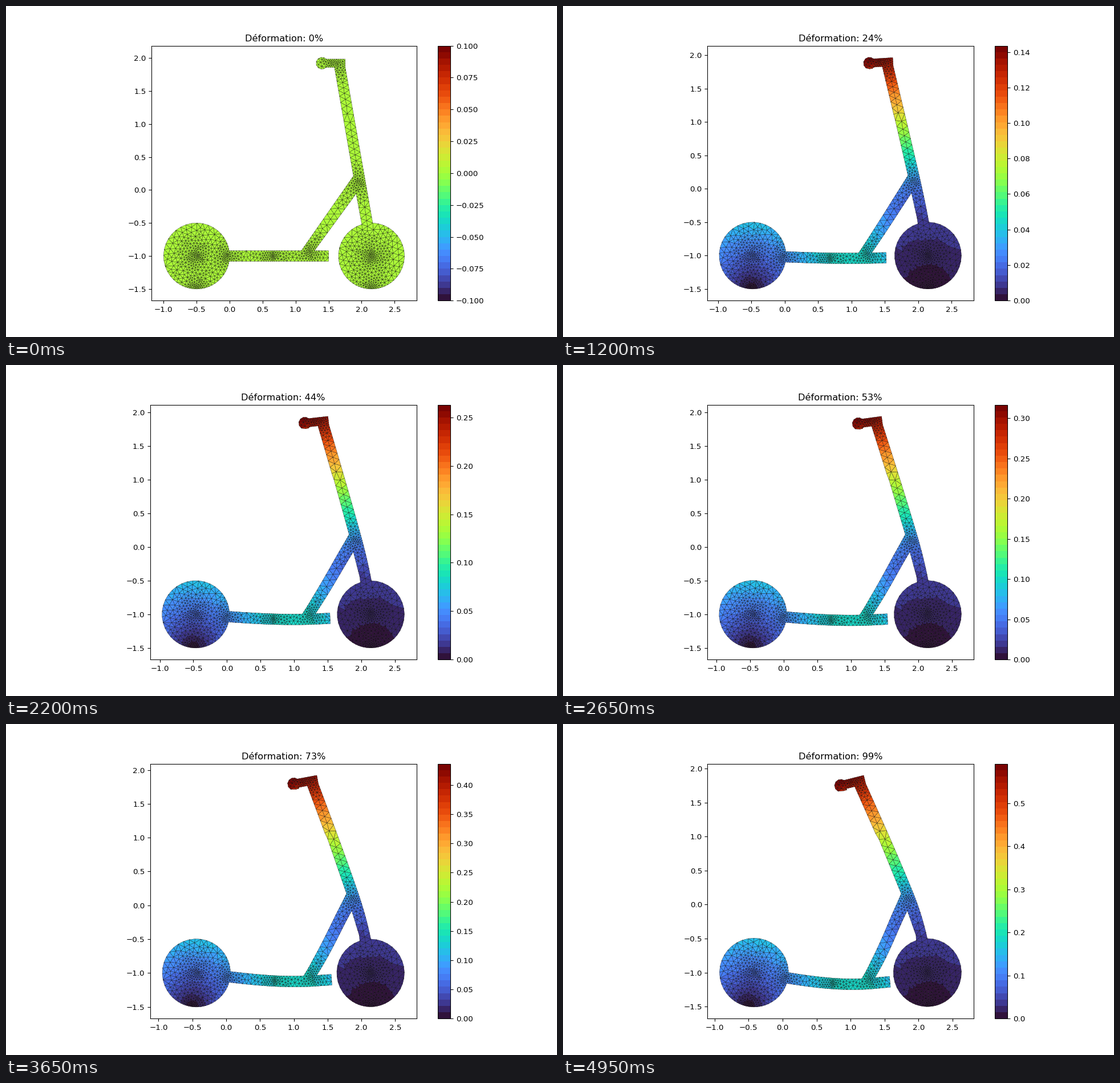
A matplotlib script that plays this animation: 966 px wide and 580 px high, repeating every 5000 ms.

```python
import numpy as np
import matplotlib.pyplot as plt
from matplotlib.animation import FuncAnimation
from matplotlib.collections import PolyCollection
from matplotlib.path import Path
from matplotlib.tri import Triangulation

FRAMES = 100
PEAK = 0.598          # largest displacement at 100 %
REAR, FRONT, GRIP = (-0.5, -1.0), (2.15, -1.0), (1.4, 1.92)
R, GRIP_R = 0.5, 0.09
DECK_TOP, DECK_BOTTOM = -0.92, -1.08
BAR_LOW, BAR_HIGH = 1.8575, 1.9825
LEAN = 0.176          # horizontal run of the column per unit of height

# Points where the mesh is refined: x, y, local element size
FOCI = np.array([
    (-0.5, -1.0, 0.016), (-0.5, -1.5, 0.014), (-0.04, -1.0, 0.019),
    (0.65, -1.0, 0.018), (1.22, -0.94, 0.02), (1.95, 0.1, 0.02),
    (2.15, -1.0, 0.016), (2.15, -1.5, 0.014), (1.5, 1.92, 0.026),
    (1.6, 1.92, 0.021), (1.69, 1.92, 0.025),
])


def size(p):
    gap = np.hypot(p[:, None, 0] - FOCI[:, 0], p[:, None, 1] - FOCI[:, 1])
    return np.minimum(0.095, (FOCI[:, 2] + 0.14 * gap).min(axis=1))


# ---------------------------------------------------------------- outline

def line(a, b):
    return np.linspace(a, b, 300)


def arc(centre, r, start, stop):
    a = np.linspace(start, stop, 600)
    return np.column_stack([centre[0] + r * np.cos(a), centre[1] + r * np.sin(a)])


def split(curve):
    """Nodes along a curve, spaced by the local element size, without the end."""
    step = np.hypot(*np.diff(curve, axis=0).T)
    mid = (curve[1:] + curve[:-1]) / 2
    s = np.concatenate([[0], np.cumsum(step / size(mid))])
    count = max(1, int(round(s[-1])))
    at = np.linspace(0, s[-1], count + 1)[:-1]
    return np.column_stack([np.interp(at, s, curve[:, k]) for k in (0, 1)])


def build_outline():
    rear = np.arcsin(0.08 / R)
    grip = np.arcsin(0.0625 / GRIP_R)
    parts = [arc(REAR, R, rear, 2 * np.pi - rear)]

    def go(*points):
        for q in points:
            parts.append(line(parts[-1][-1], q))

    go((1.5, DECK_BOTTOM), (1.5, DECK_TOP), (1.286, DECK_TOP), (1.918, -0.056))
    wheel = arc(FRONT, R, 1.867, 2 * np.pi + 1.533)
    go(wheel[0])
    parts.append(wheel)
    go((1.753, BAR_LOW), (1.753, BAR_HIGH))
    ring = arc(GRIP, GRIP_R, grip, 2 * np.pi - grip)
    go(ring[0])
    parts.append(ring)
    go((1.589, BAR_LOW), (1.877, 0.212), (1.087, DECK_TOP), parts[0][0])
    return np.vstack([split(c) for c in parts])


# ---------------------------------------------------------------- mesh

def scatter(edge, inside, rng):
    """Random interior nodes that keep the local element size apart."""
    clouds = [FOCI[:, :2], rng.uniform((-1, -1.5), (2.65, 2.02), (22000, 2))]
    for x, y, _ in FOCI:
        r = 0.5 * rng.random(2000) ** 1.6
        a = rng.uniform(0, 2 * np.pi, 2000)
        clouds.append(np.column_stack([x + r * np.cos(a), y + r * np.sin(a)]))
    cand = np.vstack(clouds)
    cand = cand[inside.contains_points(cand)]
    reach = (0.78 * size(cand)) ** 2
    nodes = np.empty((len(edge) + len(cand), 2))
    nodes[:len(edge)] = edge
    n = len(edge)
    for p, limit in zip(cand, reach):
        d = nodes[:n] - p
        if (d[:, 0] ** 2 + d[:, 1] ** 2).min() > limit:
            nodes[n] = p
            n += 1
    return nodes[:n].copy()


def build_mesh():
    rng = np.random.default_rng(4)
    edge = build_outline()
    inside = Path(np.vstack([edge, edge[:1]]))
    nodes = scatter(edge, inside, rng)
    fixed = len(edge)
    for _ in range(12):
        links = Triangulation(*nodes.T).edges
        both = np.vstack([links, links[:, ::-1]])
        total = np.zeros_like(nodes)
        np.add.at(total, both[:, 0], nodes[both[:, 1]])
        degree = np.maximum(np.bincount(both[:, 0], minlength=len(nodes)), 1)
        mean = total / degree[:, None]
        nodes[fixed:] += 0.6 * (mean[fixed:] - nodes[fixed:])
    tris = Triangulation(*nodes.T).triangles
    a, b, c = (nodes[tris[:, k]] for k in range(3))
    area = np.abs((b[:, 0] - a[:, 0]) * (c[:, 1] - a[:, 1])
                  - (b[:, 1] - a[:, 1]) * (c[:, 0] - a[:, 0]))
    keep = inside.contains_points((a + b + c) / 3) & (area > 1e-6)
    return nodes, tris[keep]


# ---------------------------------------------------------------- displacement

def turn(x, y, x0, y0, angle):
    return np.array([-angle * (y - y0), angle * (x - x0)])


def deck_shift(x, y):
    """Sagging deck; straight beyond the foot of the strut."""
    s = np.clip(x, 0, 1.25)
    sag = -0.08 - 0.16 * s + 0.031 * s ** 2 + 0.0373 * s ** 3
    slope = -0.16 + 0.062 * s + 0.1119 * s ** 2
    return np.array([0.08 + 0 * s, sag]) + turn(x, y, s, -1.0, slope)


def column_shift(x, y, low=-0.5, high=1.855):
    """Leaning column; each level turns a little more than the one below."""
    h = np.clip(y, low, high)
    z = np.clip(h + 0.5, 0, 0.7)
    q = np.clip((h - 0.2) / 1.655, 0, 1)
    angle = 0.04 + 0.253 * z + 0.035 * (2 * q - q ** 2)
    swing = (0.04 * z + 0.1265 * z ** 2
             + 1.655 * (0.217 * q + 0.035 * (q ** 2 - q ** 3 / 3)))
    squeeze = 0.022 * z
    axis = 1.6715 + LEAN * (1.853 - h)
    base = np.array([-0.04 - swing, -0.0026 - LEAN * swing - squeeze])
    return base + turn(x, y, axis, h, angle)


def displacement(nodes):
    x, y = nodes.T
    left = 1.589 + LEAN * (1.853 - y)
    up = np.maximum(y - DECK_TOP, 0)
    across = np.maximum(left - x, 0)
    t = up / np.maximum(up + across, 1e-9)
    w = t * t * (3 - 2 * t)
    deck = deck_shift(x, y)
    strut = (1 - w) * deck + w * column_shift(x, y, -0.05, 0.22)
    rear = np.hypot(x - REAR[0], y - REAR[1]) < R + 1e-3
    front = np.hypot(x - FRONT[0], y - FRONT[1]) < R + 1e-3
    column = (x >= left - 1e-6) | (y > 1.85)
    on_deck = y <= DECK_TOP + 1e-6
    u = np.select(
        [rear, front, column, on_deck],
        [turn(x, y, REAR[0], -1.5, -0.16), turn(x, y, FRONT[0], -1.5, 0.04),
         column_shift(x, y), deck],
        strut)
    return 1.01 * u.T


nodes, tris = build_mesh()
shift = displacement(nodes)
amount = np.hypot(*shift.T)[tris].mean(axis=1)

# ---------------------------------------------------------------- drawing

fig, ax = plt.subplots(figsize=(10, 6.00415), dpi=96.6)   # 966 x 580 px
ax.set_aspect("equal")
mesh = PolyCollection(nodes[tris], cmap=plt.get_cmap("turbo", 40),
                      edgecolors="k", linewidths=0.25)
mesh.set_array(0 * amount)
mesh.set_clim(-0.1, 0.1)
ax.add_collection(mesh)
fig.colorbar(mesh, ax=ax)


def padded(v):
    pad = 0.05 * (v.max() - v.min())
    return v.min() - pad, v.max() + pad


def draw(i):
    t = i / 100
    pos = nodes + t * shift
    mesh.set_verts(pos[tris])
    mesh.set_array(t * amount)
    if i:
        mesh.set_clim(0, PEAK * t)
    else:
        mesh.set_clim(-0.1, 0.1)
    ax.set_xlim(*padded(pos[:, 0]))
    ax.set_ylim(*padded(pos[:, 1]))
    ax.set_title(f"Déformation: {i}%")
    return [mesh]


anim = FuncAnimation(fig, draw, frames=FRAMES, interval=50, repeat=True,
                     repeat_delay=0, blit=False)
plt.show()
```
